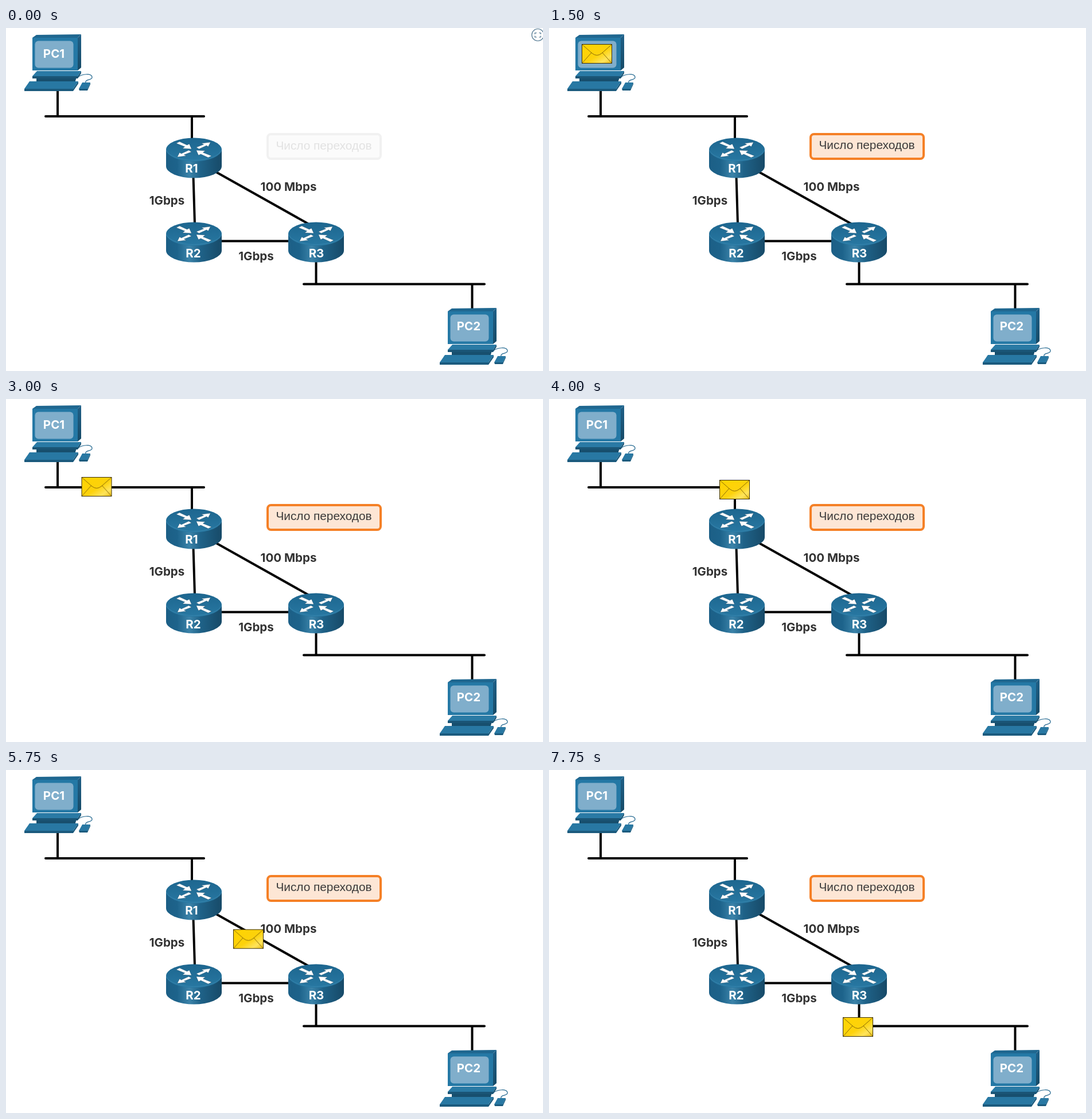
An HTML page for the animation above (8000 ms loop, 936 by 598 pixels).

```html
<!DOCTYPE html>
<html lang="ru">
<head>
<meta charset="utf-8">
<title>Число переходов</title>
<style>
  html, body { margin: 0; width: 100%; height: 100%; overflow: hidden; background: #fff; }
  svg { display: block; width: 936px; height: 598px; }
  text { font: 700 20.5px Inter, sans-serif; text-anchor: middle; }
  .wire { stroke: #000; stroke-width: 4; fill: none; stroke-linecap: round; }
  .speed { fill: #333; }
  .name { fill: #fff; }
  .note text { font: 20.8px "Liberation Sans", Arial, sans-serif; fill: #3b3b3b; }
  .note rect { fill: #fde6d5; stroke: #f58026; stroke-width: 4; }
  .ghost rect { fill: #fbfbfb; stroke: #f1f1f1; }
  .ghost text { fill: #e2e2e2; }

  /* The small negative delay keeps step edges clear of rounding. */
  .icon { animation: icon 8s step-end -4ms infinite; }
  .fade { animation: fade 8s step-end -4ms infinite; }
  .mail { animation: fade 8s step-end -4ms infinite, travel 8s step-end -4ms infinite; }

  @keyframes icon { 0% { opacity: 1; } 6.25%, 100% { opacity: 0; } }
  @keyframes fade {
    0% { opacity: 0; }
    12.5% { opacity: .35; }
    15.625% { opacity: .7; }
    18.75%, 100% { opacity: 1; }
  }
  @keyframes travel {
    0% { transform: translate(57px, 28px); }
    21.875% { transform: translate(57px, 28px); animation-timing-function: steps(3); }
    31.25% { transform: translate(58px, 136px); animation-timing-function: steps(2); }
    37.5% { transform: translate(131.5px, 136px); animation-timing-function: steps(4); }
    50% { transform: translate(297px, 141px); animation-timing-function: steps(2); }
    56.25% { transform: translate(297px, 187px); }
    59.375% { transform: translate(303px, 211px); animation-timing-function: steps(9); }
    87.5% { transform: translate(512px, 361px); animation-timing-function: steps(3); }
    96.875%, 100% { transform: translate(512px, 431px); }
  }
</style>
</head>
<body>
<svg viewBox="0 0 936 598">
  <defs>
    <linearGradient id="side">
      <stop offset="0" stop-color="#1c5f86"/>
      <stop offset=".2" stop-color="#1d638b"/>
      <stop offset=".42" stop-color="#3b83a9"/>
      <stop offset=".62" stop-color="#1f6288"/>
      <stop offset="1" stop-color="#174a68"/>
    </linearGradient>
    <linearGradient id="lid" x2="0" y2="1">
      <stop offset="0" stop-color="#1d668f"/>
      <stop offset="1" stop-color="#2878a2"/>
    </linearGradient>
    <linearGradient id="edge" x2="0" y2="1">
      <stop offset="0" stop-color="#1f6088"/>
      <stop offset="1" stop-color="#174a66"/>
    </linearGradient>
    <linearGradient id="gold" x2="1" y2="1">
      <stop offset="0" stop-color="#ffd400"/>
      <stop offset=".55" stop-color="#fdd20c"/>
      <stop offset=".8" stop-color="#ffe45c"/>
      <stop offset="1" stop-color="#e9bd14"/>
    </linearGradient>

    <g id="arrows">
      <path d="M-31-11L-25-14L-12-8L-8-10L-4-1L-20-2L-16-5Z"/>
      <path d="M4-4L17-9L13-11L29-13L25-5L22-7L9-1Z"/>
    </g>
    <g id="router">
      <path d="M-48.5 0V29A48.5 20.5 0 0 0 48.5 29V0Z" fill="url(#side)"/>
      <ellipse rx="48.5" ry="20.5" fill="url(#lid)"/>
      <path d="M-48 1A48.5 20.5 0 0 0 48 1" fill="none" stroke="#3b88b0" stroke-width=".8"/>
      <g fill="#fff" stroke="#174d6c" stroke-width=".5">
        <use href="#arrows"/>
        <use href="#arrows" transform="rotate(180)"/>
      </g>
    </g>
    <g id="pc">
      <path d="M125 86C132 80 150 78 150 86C150 92 137 88 139 96" fill="none" stroke="#22678f" stroke-width="1.2"/>
      <path d="M53 82H124L120 96H53Z" fill="#174f6e"/>
      <path d="M46 84L54 75H131L125 84Z" fill="#2a7aa5"/>
      <path d="M46 84H125L131 75V79L125 88H46Z" fill="#1a5576"/>
      <path d="M32 106L41 93H126L117 106Z" fill="#2878a3"/>
      <path d="M32 106H117L126 93V97L117 110H32Z" fill="#1b5a7d"/>
      <path d="M127 106L133 95H147L142 106Z" fill="#2878a3"/>
      <path d="M127 106H142L147 95V98L142 109H128Z" fill="#1b5a7d"/>
      <path d="M46 17L53 12L131 11L125 17Z" fill="#1f6790"/>
      <path d="M125 17L131 11V69L125 74Z" fill="url(#edge)"/>
      <path d="M46 17H125V74H46Z" fill="#2478a5"/>
      <rect x="50.5" y="22.5" width="67" height="47" rx="6" fill="#80aecb"/>
    </g>
  </defs>

  <g class="wire">
    <path d="M90 108V154M69 154H345M324 154V196"/>
    <path d="M326.5 258L329 342M366 251L528 342M374 371.5H495"/>
    <path d="M540.5 405V446M519 446.5H834M812.5 447V490"/>
  </g>

  <use href="#pc"/>
  <use href="#pc" x="724" y="477"/>
  <use href="#router" x="327.5" y="212"/>
  <use href="#router" x="327.5" y="359"/>
  <use href="#router" x="540.5" y="359"/>

  <g class="name">
    <text x="83.5" y="51.5">PC1</text>
    <text x="806.5" y="526.5">PC2</text>
    <text x="323.5" y="252">R1</text>
    <text x="326.5" y="399.5">R2</text>
    <text x="541" y="400">R3</text>
  </g>
  <g class="speed">
    <text x="492.5" y="284">100 Mbps</text>
    <text x="280.5" y="308">1Gbps</text>
    <text x="436" y="405">1Gbps</text>
  </g>

  <g class="note ghost">
    <rect x="456" y="185" width="197" height="43" rx="6"/>
    <text x="554" y="212">Число переходов</text>
  </g>
  <g class="note fade">
    <rect x="456" y="185" width="197" height="43" rx="6"/>
    <text x="554" y="211">Число переходов</text>
  </g>

  <g class="icon" fill="none" stroke="#4f7690" stroke-width="1.2">
    <circle cx="927" cy="12" r="10.5"/>
    <path d="M922 11V8.500H925M929 8.500H932V11M932 13.500V16H929M925 16H922V13.500"/>
  </g>

  <g class="mail">
    <rect x=".5" y=".5" width="52" height="33" fill="url(#gold)" stroke="#3a2f08"/>
    <path d="M1 1L18 16Q26.500 23 35 16L52 1M1 33L17 15M52 33L36 15" fill="none" stroke="#8a6b08" stroke-width="1"/>
  </g>
</svg>
</body>
</html>
```
